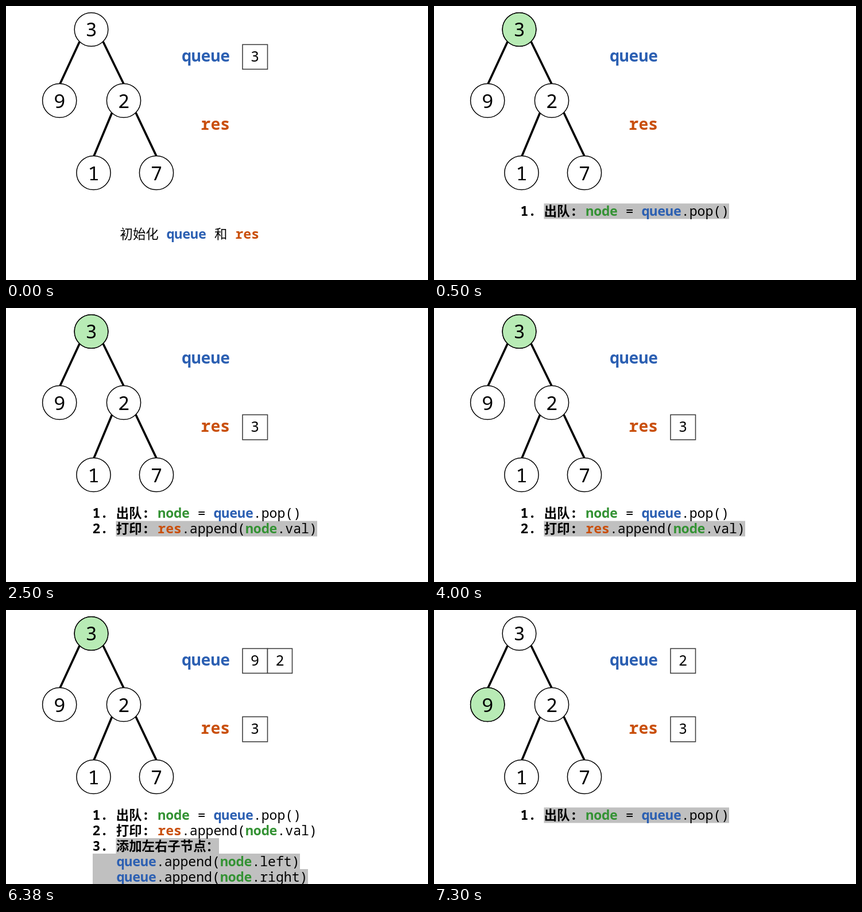
These frames come from a looping animation (735x478 px, 8000 ms). An HTML page:

```html
<!DOCTYPE html>
<html lang="zh">
<head>
<meta charset="utf-8">
<title>Level-order traversal</title>
<style>
  html, body { margin: 0; width: 100%; height: 100%; overflow: hidden; background: #fff; }
  svg { display: block; width: 735px; height: 478px; }
  text { font: 23.13px "Noto Sans Mono", "DejaVu Sans Mono", monospace; white-space: pre; fill: #000; }
  .zh { font-family: "Noto Sans CJK SC", "Noto Sans CJK", sans-serif; font-size: 22.4px; }
  .b, .q, .r, .n { font-weight: 700; }
  .q { fill: #2b5fb2; }
  .r { fill: #c94f0c; }
  .n { fill: #339233; }
  .label { font-size: 28px; text-anchor: end; }
  .nodes circle { fill: #fff; stroke: #000; stroke-width: 1.5; }
  .nodes .lit { fill: #b8ebb5; }
  .nodes text { font-size: 33.5px; text-anchor: middle; }
  .edges { fill: none; stroke: #000; stroke-width: 3.7; }
  .cell rect { fill: #fff; stroke: #404040; stroke-width: 1.6; }
  .cell text { font-size: 25px; text-anchor: middle; }
  .mark rect { fill: #c0c0c0; }

  /* Each step is a hard switch on the shared 8 s clock. */
  .step { visibility: hidden; animation: 8s step-end infinite; }
  .init { animation-name: init; }
  .root { animation-name: root; }
  .pop { animation-name: pop; }
  .popMark { animation-name: popMark; }
  .printed { animation-name: printed; }
  .print { animation-name: print; }
  .printMark { animation-name: printMark; }
  .push { animation-name: push; }
  .next { animation-name: next; }
  @keyframes init { 0% { visibility: visible } 6.25%, 100% { visibility: hidden } }
  @keyframes root { 0% { visibility: hidden } 6.25% { visibility: visible } 91.25%, 100% { visibility: hidden } }
  @keyframes pop { 0% { visibility: hidden } 6.25%, 100% { visibility: visible } }
  @keyframes popMark {
    0% { visibility: hidden } 6.25% { visibility: visible }
    31.25% { visibility: hidden } 91.25%, 100% { visibility: visible }
  }
  @keyframes printed { 0% { visibility: hidden } 31.25%, 100% { visibility: visible } }
  @keyframes print { 0% { visibility: hidden } 31.25% { visibility: visible } 91.25%, 100% { visibility: hidden } }
  @keyframes printMark { 0% { visibility: hidden } 31.25% { visibility: visible } 62.5%, 100% { visibility: hidden } }
  @keyframes push { 0% { visibility: hidden } 62.5% { visibility: visible } 91.25%, 100% { visibility: hidden } }
  @keyframes next { 0% { visibility: hidden } 91.25%, 100% { visibility: visible } }
</style>
</head>
<body>
<svg viewBox="0 0 735 478">
  <path class="edges" d="M128 62.5L94 136M169 62L205 136M184.5 186.5L153 262M226 186L262 262"/>
  <g class="nodes">
    <circle cx="148.5" cy="41" r="29.3"/>
    <circle class="lit step root" cx="148.5" cy="41" r="29.3"/>
    <circle cx="93.2" cy="165" r="29.6"/>
    <circle class="lit step next" cx="93.2" cy="165" r="29.6"/>
    <circle cx="205" cy="165" r="29.6"/>
    <circle cx="152.5" cy="291" r="29.6"/>
    <circle cx="262" cy="291" r="29.6"/>
    <text x="148.5" y="53">3</text>
    <text x="93.2" y="177.5">9</text>
    <text x="205" y="177.5">2</text>
    <text x="152.5" y="303.5">1</text>
    <text x="262" y="303.5">7</text>
  </g>

  <text class="label q" x="390" y="97">queue</text>
  <text class="label r" x="390" y="216">res</text>

  <g class="cell step init"><rect x="412" y="67.3" width="43.5" height="43"/><text x="433.5" y="97">3</text></g>
  <g class="cell step push">
    <rect x="412" y="67.3" width="43.5" height="43"/><text x="433.5" y="97">9</text>
    <rect x="455.5" y="67.3" width="43" height="43"/><text x="477" y="97">2</text>
  </g>
  <g class="cell step next"><rect x="412" y="67.3" width="43.5" height="43"/><text x="433.5" y="97">2</text></g>
  <g class="cell step printed"><rect x="412" y="186.3" width="43.5" height="43.5"/><text x="433.5" y="216">3</text></g>

  <text class="step init" y="405.5"><tspan class="zh" x="198.5">初始化</tspan><tspan class="q" x="279.5">queue</tspan><tspan class="zh" x="363">和</tspan><tspan class="r" x="399.5">res</tspan></text>

  <g class="mark step popMark"><rect x="191.5" y="344.5" width="322.5" height="27"/></g>
  <g class="mark step printMark"><rect x="191.5" y="371.5" width="350.5" height="27"/></g>
  <g class="mark step push">
    <rect x="191.5" y="398" width="179.5" height="27.5"/>
    <rect x="151" y="425" width="361" height="27.5"/>
    <rect x="151" y="452" width="375" height="26"/>
  </g>

  <text class="step pop" y="365.5"><tspan class="b" x="150.5">1.</tspan><tspan class="zh b" x="191.8">出队</tspan><tspan class="b" x="236.5">:</tspan><tspan class="n" x="264.3">node</tspan> = <tspan class="q">queue</tspan>.pop()</text>
  <text class="step print" y="392.5"><tspan class="b" x="150.5">2.</tspan><tspan class="zh b" x="191.8">打印</tspan><tspan class="b" x="236.5">:</tspan><tspan class="r" x="264.3">res</tspan>.append(<tspan class="n">node</tspan>.val)</text>
  <g class="step push">
    <text y="419.5"><tspan class="b" x="150.5">3.</tspan><tspan class="zh b" x="191.8">添加左右子节点：</tspan></text>
    <text y="446.5"><tspan class="q" x="192.5">queue</tspan>.append(<tspan class="n">node</tspan>.left)</text>
    <text y="473.5"><tspan class="q" x="192.5">queue</tspan>.append(<tspan class="n">node</tspan>.right)</text>
  </g>
</svg>
</body>
</html>
```
